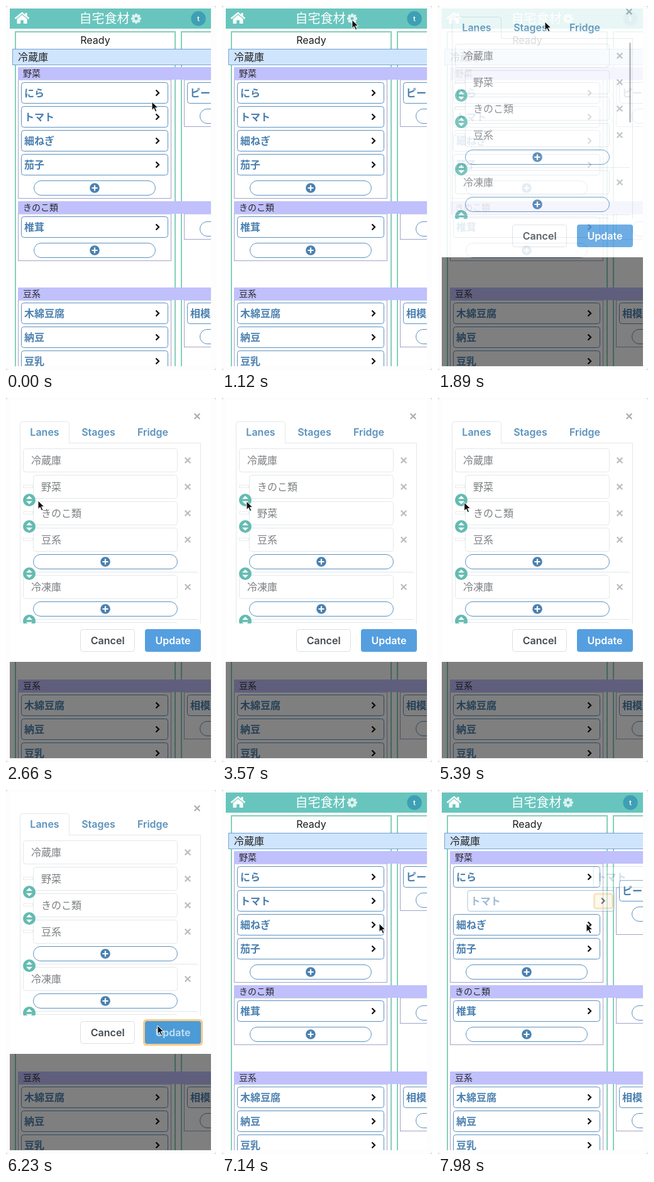
An HTML page that plays this animation: 334 by 578 pixels, repeating every 8 s.

```html
<!DOCTYPE html>
<html lang="ja">
<head>
<meta charset="utf-8">
<style>
html, body { margin: 0; width: 100%; height: 100%; overflow: hidden; background: #fff; }
svg { display: block; width: 334px; height: 578px; }
text { font-family: Inter, "Noto Sans CJK JP", "Noto Sans CJK", sans-serif; }
</style>
</head>
<body>
<svg id="stage" viewBox="0 0 334 578"></svg>
<script>
const LOOP = 8000;
const BLUE = '#4a80b0', LINE = '#5b92bf', PALE = '#e3e7ea', GREEN = '#63bbb1';

// ---- markup helpers ----
const rect = (x, y, w, h, fill, stroke, r = 0, extra = '') =>
  `<rect x="${x}" y="${y}" width="${w}" height="${h}" rx="${r}" fill="${fill}" stroke="${stroke || 'none'}" ${extra}/>`;
const text = (s, x, cy, size, fill, weight = 400, anchor = 'start') =>
  `<text x="${x}" y="${cy + size * 0.37}" font-size="${size}" fill="${fill}" font-weight="${weight}" text-anchor="${anchor}">${s}</text>`;
const path = (d, stroke, width, fill = 'none') =>
  `<path d="${d}" fill="${fill}" stroke="${stroke}" stroke-width="${width}"/>`;
const group = (id, body, extra = '') => `<g id="${id}" ${extra}>${body}</g>`;

const plus = (x, y) => `<circle cx="${x}" cy="${y}" r="7.8" fill="${BLUE}"/>` +
  path(`M${x - 4.5} ${y}h9M${x} ${y - 4.5}v9`, '#fff', 2.2);
const pill = (x, y, w) => rect(x + .5, y - 11.5, w - 1, 23, '#fff', LINE, 11.5) + plus(x + w / 2, y);
const cross = (x, y, c = '#b9bdc1') =>
  path(`M${x - 4.3} ${y - 4.3}l8.6 8.6m0 -8.6l-8.6 8.6`, c, 2.3);
const chevron = (x, y) => path(`M${x - 2.5} ${y - 4.5}l4.5 4.5l-4.5 4.5`, '#111', 2.3);

// ---- board ----
const card = (name, x, y) => rect(x + .5, y + .5, 233, 33, '#fff', LINE, 4) +
  text(name, x + 5, y + 17, 16, BLUE, 700) + chevron(x + 217, y + 17);

const cell = (x, top, names) => {
  const add = top + names.length * 38 + (names.length ? 20 : 24);
  return rect(x + .5, top, 243, add + 16.5 - top, '#fff', '#a3a3cb') +
    names.map((n, i) => card(n, x + 5, top + 4 + i * 38)).join('') +
    pill(x + 25, add, 194);
};
const bar = (name, y) => rect(19, y, 320, 20, '#c0c0fc') + text(name, 27, y + 10, 14, '#26262e');

const gear = (x, y) => {
  let teeth = '';
  for (let a = 0; a < 360; a += 45)
    teeth += rect(x - 1.9, y - 8, 3.8, 4, '#dff2f0', '', 1, `transform="rotate(${a} ${x} ${y})"`);
  return teeth + `<circle cx="${x}" cy="${y}" r="4.3" fill="none" stroke="#dff2f0" stroke-width="3.6"/>`;
};

const header = rect(6, 4, 320, 32, '#68c5bd') +
  path('M14.5 20L25.5 11L36.5 20', '#fff', 2.4) + rect(30.5, 11, 3, 6, '#fff') +
  path('M17.5 20.5L25.5 14L33.5 20.5V28H27.8V22.5H23.2V28H17.5Z', 'none', 0, '#fff') +
  text('自宅食材', 116.5, 20, 20, '#fff', 300) + gear(207, 20) +
  '<circle cx="306" cy="20" r="11.7" fill="#3e9fb5"/>' + text('t', 306, 20, 11, '#fff', 600, 'middle');

const board = rect(6, 4, 320, 568, '#fff') + header +
  rect(15, 41, 254, 560, '#fff', '#86cfb9', 0, 'stroke-width="2"') +
  rect(279, 41, 254, 560, '#fff', '#86cfb9', 0, 'stroke-width="2"') +
  text('Ready', 142, 54, 16, '#1c1c1c', 400, 'middle') +
  rect(10.5, 68.5, 340, 25, '#cfe5fd', '#6fa5d8') + text('冷蔵庫', 19, 81, 16, '#222') +
  cell(19, 117, ['にら', 'トマト', '細ねぎ', '茄子']) +
  cell(19, 330, ['椎茸']) + cell(19, 467, ['木綿豆腐', '納豆', '豆乳', '油揚げ']) +
  group('nextBox', rect(283.5, 117, 243, 74.5, '#fff', '#a3a3cb')) +
  group('next', card('ピーマン', 288, 121) + pill(308, 175, 194)) +
  cell(283, 330, []) + cell(283, 467, ['相模産']) +
  bar('野菜', 97) + bar('きのこ類', 310) + bar('豆系', 447) +
  group('moving', rect(23, 158, 237, 36, '#fff') +
    group('leave', card('トマト', 24, 159) +
      rect(226, 165, 29, 23, '#fbf3dc', '#f2cf8e', 3, 'stroke-width="3"') + chevron(240, 176)) +
    group('enter', card('トマト', 288, 121)));

// ---- dialog ----
const field = (name, x, cy) => rect(x + .5, cy - 18.5, 272 - x, 37, '#fff', PALE, 4) +
  text(name, x + 13, cy, 16, '#7c7f82') + cross(289, cy);
const child = (id, name, cy) =>
  group(id, rect(27.5, cy - 2.5, 15, 4, '#fff', '#e9ecee') + field(name, 43, cy));
const swap = y => `<circle cx="37" cy="${y}" r="10" fill="${GREEN}"/>` +
  path(`M32 ${y - 1.8}l5 -5l5 5zM32 ${y + 1.8}l5 5l5 -5z`, 'none', 0, '#fff');
const rule = y => path(`M27 ${y}H305`, PALE, 1);

const dialog = rect(6, -20, 320, 439, '#fff') + cross(304, 29, '#a9b0b5') +
  path('M22.5 358V41.5q0 -4 4 -4H96.5q4 0 4 4V71.5H309.5V358', PALE, 1) +
  ['Lanes', 'Stages', 'Fridge'].map((s, i) =>
    text(s, [61.5, 147, 233.5][i], 54, 16, '#5b92bc', 600, 'middle')).join('') +
  `<g clip-path="url(#list)">` + field('冷蔵庫', 27, 99) +
  child('third', '豆系', 225) + child('first', '野菜', 141) + child('second', 'きのこ類', 183) +
  pill(43, 260, 230) + rule(276.5) + field('冷凍庫', 27, 300) + pill(43, 335, 230) + rule(351.5) +
  field('', 27, 375) + [162, 204, 279, 354].map(swap).join('') +
  rect(304, 78, 3, 127, '#b4b8bb', '', 1.5, 'id="scroll"') + '</g>' +
  rect(118.5, 367.5, 86, 35, '#fff', '#dcdfe2', 4) + text('Cancel', 161.7, 385, 16, '#444a50', 600, 'middle') +
  rect(221, 367, 89, 36, '#559fe0', '', 4) + text('Update', 265.5, 385, 16, '#fff', 600, 'middle') +
  group('focus', rect(221, 367, 89, 36, '#4c9bd6', '', 4) + text('Update', 265.5, 385, 16, '#c3dff3', 600, 'middle') +
    rect(219.5, 365.5, 92, 39, 'none', '#f4cb8c', 4, 'stroke-width="3"'));

const arrow = path('M0 0V13.5L3.2 10.6L5.5 15.8L7.9 14.7L5.6 9.7H10Z', '#fff', 1, '#111');

const stage = document.getElementById('stage');
stage.innerHTML = `<defs>
  <clipPath id="view"><rect x="6" y="4" width="320" height="568"/></clipPath>
  <clipPath id="list"><rect x="22" y="72" width="288" height="286"/></clipPath></defs>` +
  rect(0, 0, 334, 578, '#dcdcdc') + rect(0, 0, 334, 578, '#fdfdfd', '', 5) +
  `<g clip-path="url(#view)">${board}` + rect(6, 419, 320, 200, '#000', '', 0, 'id="shade" opacity=".5"') +
  group('dialog', dialog) + '</g>' + group('cursor', arrow);

// ---- motion ----
const $ = id => document.getElementById(id);
const set = (id, name, v) => $(id).setAttribute(name, v);
const move = (id, x, y) => set(id, 'transform', `translate(${x} ${y})`);
const show = (id, on) => set(id, 'display', on ? 'inline' : 'none');
const ramp = (t, a, b) => Math.min(1, Math.max(0, (t - a) / (b - a)));
const ease = p => p * p * (3 - 2 * p);
const easeOut = p => 1 - (1 - p) ** 2;

// time, x, y of the pointer
const route = [
  [0, 232, 152], [250, 232, 152], [1000, 207, 22], [1680, 205, 22], [1890, 170, 25],
  [2660, 51, 163], [2900, 39, 163], [3700, 39, 164], [4200, 50, 180], [4550, 50, 180],
  [4850, 39, 163], [5350, 39, 163], [5950, 241, 374], [6400, 241, 374], [6900, 250, 212],
  [7200, 250, 212], [7500, 240, 178], [7780, 240, 178], [7960, 236, 212], [8000, 236, 212]
];
function pointer(t) {
  const i = Math.max(1, route.findIndex(k => k[0] > t));
  const [a, b] = [route[i - 1], route[i]];
  const p = ease(ramp(t, a[0], b[0]));
  return [a[1] + (b[1] - a[1]) * p, a[2] + (b[2] - a[2]) * p];
}

function draw(t) {
  move('cursor', ...pointer(t));

  const open = t >= 1820 && t < 6600;
  show('dialog', open);
  show('shade', open);
  const closing = ramp(t, 6400, 6600);
  const lift = -20 * (1 - ease(ramp(t, 1900, 2150)) + ease(closing));
  move('dialog', 0, lift);
  set('shade', 'y', 419 + lift);
  set('dialog', 'opacity', Math.min(0.4 + 0.45 * ramp(t, 1820, 1885) + 0.15 * ramp(t, 1900, 1970), 1 - closing));
  set('scroll', 'opacity', 1 - ramp(t, 2250, 2500));
  show('focus', t >= 6090);

  const swapped = ease(ramp(t, 3100, 3350)) - ease(ramp(t, 5050, 5300));
  move('first', 0, 42 * swapped);
  move('second', 0, -42 * swapped);

  const p = ramp(t, 7840, 8240);
  show('moving', p > 0);
  move('leave', 64 * p, 0);
  set('leave', 'opacity', 1 - 1.3 * p);
  move('enter', 64 * (p - 1), 0);
  set('enter', 'opacity', 0.7 * p);
  move('next', 0, 38 * easeOut(p));
  move('nextBox', 0, p > 0 ? 38 : 0);
}

function tick() {
  draw(performance.now() % LOOP);
  requestAnimationFrame(tick);
}
tick();
</script>
</body>
</html>
```
